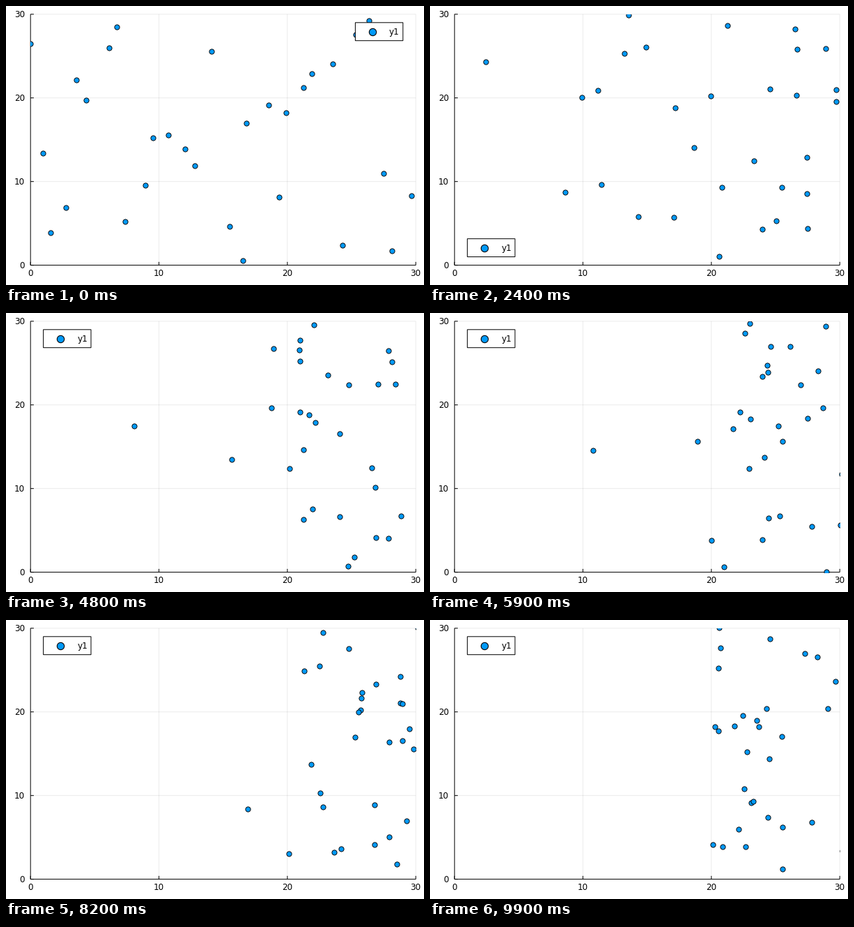
Recreate the animation shown at these times as a matplotlib script. Size 600 px wide and 400 px high, loop 10 s.

```python
import numpy as np
import matplotlib.pyplot as plt
from matplotlib.animation import FuncAnimation
from matplotlib.patches import Rectangle

W, H, DPI = 600, 400, 100
FRAMES, STEP = 100, 100
LEFT, RIGHT, TOP, BOTTOM = 35.2, 588.2, 11.8, 371.6
SIZE = 30
PX = 72 / DPI
FONT = 12 * PX

# Dots pass the gate from the left only, then stay between gate and wall.
GATE = 20
SLACK = 0.2
COUNT = 29

rng = np.random.default_rng(4)


def spread(n):
    """Random values, one in each of n equal slices of the box."""
    return (rng.permutation(n) + rng.random(n)) * SIZE / n


x0, y0 = spread(COUNT), spread(COUNT)
vx = rng.uniform(0.28, 0.38, COUNT)
vx *= np.where(x0 < GATE, 1, rng.choice([-1, 1], COUNT))
vy = rng.uniform(-0.3, 0.3, COUNT)

# The last dot to reach the gate.
LONE_T = [0, 24, 38, 77, 91, 99]
LONE_X = [0, 2.45, 5.55, 15.3, 19.8, 20.1]
LONE_Y = [26.5, 24.35, 20.2, 9.7, 6.0, 4.15]


def fold(u, lo, hi):
    """Bounce a free coordinate between two walls."""
    w = hi - lo
    return hi - np.abs((u - lo) % (2 * w) - w)


def to_px(x, y):
    return (LEFT + (RIGHT - LEFT) * x / SIZE,
            BOTTOM - (BOTTOM - TOP) * y / SIZE)


def positions(i):
    x, y = x0 + vx * i, y0 + vy * i
    waiting = (x0 < GATE) & (x < GATE)
    x = np.where(waiting, x, fold(x, GATE, SIZE + SLACK))
    y = fold(y, -SLACK, SIZE + SLACK)
    return to_px(np.append(x, np.interp(i, LONE_T, LONE_X)),
                 np.append(y, np.interp(i, LONE_T, LONE_Y)))


def legend_corner(i):
    if i < 13:
        return 501.4, 23.8
    return (53.6, 333.7) if i < 30 else (53.6, 23.8)


plt.rcParams["font.family"] = "DejaVu Sans"
fig = plt.figure(figsize=(W / DPI, H / DPI), dpi=DPI, facecolor="white")
ax = fig.add_axes([0, 0, 1, 1])
ax.set_xlim(0, W)
ax.set_ylim(H, 0)
ax.axis("off")


def line(xs, ys, alpha=1, z=2):
    ax.plot(xs, ys, color="black", alpha=alpha, lw=PX, zorder=z,
            solid_capstyle="butt", snap=False)


def label(x, y, s, ha, z=2):
    return ax.text(x, y, s, ha=ha, va="baseline", fontsize=FONT, zorder=z)


def marker(size, edge, z):
    return ax.plot([], [], "o", ms=size * PX, mew=edge * PX, mfc="#009af9",
                   mec="black", zorder=z, snap=False)[0]


for v in range(0, SIZE + 1, 10):
    x, y = to_px(v, v)
    if v:
        line([x, x], [TOP, BOTTOM], 0.08, 1)
        line([LEFT, RIGHT], [y, y], 0.08, 1)
    line([x, x], [BOTTOM, BOTTOM - 4.7])
    line([LEFT, LEFT + 4.7], [y, y])
    label(x, 387.4, str(v), "center")
    label(27.2, y + 4.4, str(v), "right")
line([LEFT, LEFT], [TOP, BOTTOM])
line([LEFT, RIGHT], [BOTTOM, BOTTOM])

dots = marker(7.2, 0.9, 3)
dots.set_clip_path(Rectangle((LEFT, TOP), RIGHT - LEFT, BOTTOM - TOP,
                             transform=ax.transData))

box = ax.add_patch(Rectangle((0, 0), 68.4, 25.9, fc="white", ec="black",
                             lw=PX, zorder=4, snap=False))
key = marker(10.3, 1.1, 5)
name = label(0, 0, "y1", "left", 5)


def draw(i):
    dots.set_data(*positions(i))
    x, y = legend_corner(i)
    box.set_xy((x, y))
    key.set_data([x + 24.6], [y + 13])
    name.set_position((x + 48.6, y + 17.4))
    return dots, box, key, name


anim = FuncAnimation(fig, draw, frames=FRAMES, interval=STEP,
                     repeat=True, repeat_delay=0, blit=False)
plt.show()
```
